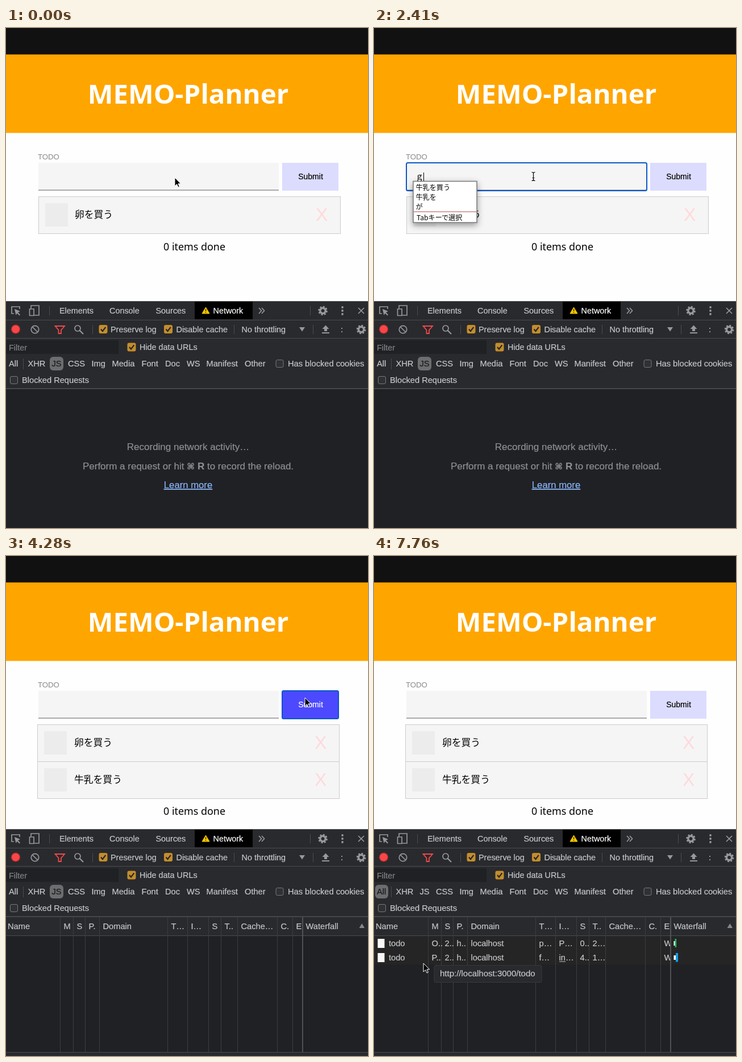
These frames come from a looping animation (637x879 px, 8 s). An HTML page:

```html
<!DOCTYPE html>
<html lang="ja">
<head>
<meta charset="utf-8">
<title>Task list</title>
<style>
html, body { margin: 0; width: 100%; height: 100%; overflow: hidden; background: #202124; }
svg { display: block; width: 100vw; height: 100vh; }
text { font-family: "Liberation Sans", Arial, sans-serif; white-space: pre; fill: currentColor; }
.jp text { font-family: "Noto Sans CJK JP", "Noto Sans CJK", sans-serif; }
.title, .jp .done { font-family: "Noto Sans", "Open Sans", sans-serif; text-anchor: middle; }
.title { font-size: 47.4px; font-weight: 700; color: #fff; }
.done { font-size: 17.9px; }
.item { font-size: 16.8px; }
.remove { font-size: 32px; color: #ffd9dc; }
.field { font-size: 14px; }
.mid { text-anchor: middle; }
.menu text { font: 600 12.2px Inter, "Noto Sans CJK JP", "Noto Sans CJK", sans-serif; color: #f1f3f4; }
.menu .kana { font-size: 11.5px; font-weight: 700; }
.ime text { font-size: 12.1px; }
.tools text { font-size: 14.65px; color: #c5c8cc; }
.tools text, .mid .field { stroke: currentColor; stroke-width: .2; }
.tools .bar text { font-size: 14.4px; }
.tools .dim { color: #808387; }
.tools .white { color: #fff; }
.tools .chosen { color: #18191b; }
.tools .hint { font-size: 17px; color: #8c8f92; text-anchor: middle; }
.tools .link { font-size: 16.7px; color: #8ab4f8; text-decoration: underline; }
.tools .url { font-size: 15px; }
.icon { fill: none; stroke: #95989c; stroke-width: 1.7; }
.rule { fill: none; stroke: #494c50; }
.ring { fill: none; stroke: #0b57c9; stroke-width: 2; }
</style>
</head>
<body>
<svg viewBox="0 0 637 879" preserveAspectRatio="none">
  <defs>
    <filter id="shadow" x="-40%" y="-40%" width="180%" height="190%">
      <feDropShadow dx="0" dy="4" stdDeviation="6" flood-opacity=".4"/>
    </filter>
    <clipPath id="tableClip"><rect y="634" width="521" height="240"/></clipPath>
    <g id="todo">
      <rect x=".5" y=".5" width="531" height="65" fill="#f5f5f5" stroke="#ccc"/>
      <rect x="12" y="12" width="40" height="41" fill="#ececec"/>
      <text class="remove" x="488" y="43">X</text>
    </g>
    <g id="gear" fill="none" stroke="#95989c">
      <circle r="4.7" stroke-width="3.4"/>
      <circle r="7" stroke-width="2.6" stroke-dasharray="3 2.5"/>
    </g>
    <g id="checked">
      <rect width="15" height="15" rx="3" fill="#c48d2b"/>
      <path d="M3.5 7.5L6.5 11L11.8 3.8" fill="none" stroke="#242528" stroke-width="2.2"/>
    </g>
    <rect id="unchecked" width="13" height="13" rx="2.5" fill="#303134" stroke="#77797c"/>
  </defs>

  <!-- page -->
  <rect width="637" height="481" fill="#fefefe"/>
  <rect width="637" height="47" fill="#111"/>
  <rect y="46.5" width="637" height="138" fill="#ffa500"/>
  <text class="title" x="320.5" y="133">MEMO-Planner</text>
  <text x="56" y="231" font-size="13.2" color="#888">TODO</text>
  <rect x="57" y="237" width="423" height="49" fill="#f5f5f5"/>
  <path d="M57 285H480" stroke="#aaa" stroke-width="2"/>

  <g class="mid">
    <rect x="486" y="237" width="99" height="49" fill="#dcdcff"/>
    <text class="field" x="536" y="266">Submit</text>
    <g data-on="3750-5630">
      <rect x="486" y="237" width="99" height="49" fill="#4c49ff"/>
      <text class="field" x="536" y="266" color="#fff">Submit</text>
    </g>
  </g>
  <rect class="ring" data-on="1340-4010" x="57" y="237" width="423" height="49" rx="2.5"/>
  <rect class="ring" data-on="4010-6690" x="486" y="237" width="99" height="49" rx="2.5"/>

  <g class="jp" data-on="0-4280">
    <use href="#todo" x="57" y="296"/>
    <text class="item" x="121" y="334">卵を買う</text>
    <text class="done" x="331.5" y="391">0 items done</text>
  </g>
  <g class="jp" data-on="4280-8000">
    <use href="#todo" x="55" y="296"/>
    <use href="#todo" x="55" y="361"/>
    <text class="item" x="120" y="334">卵を買う</text>
    <text class="item" x="120" y="399">牛乳を買う</text>
    <text class="done" x="331.5" y="455">0 items done</text>
  </g>

  <!-- typing -->
  <g class="jp">
    <text class="field" data-on="2410-2680" x="73" y="266">ｇ</text>
    <text class="field" data-on="2680-2950" x="73" y="266">ぎゅう</text>
    <text class="field" data-on="2950-4280" x="73" y="266">牛乳を買う</text>
    <path data-on="2950-3210" d="M73 270.5H143" stroke="#000"/>
  </g>
  <g stroke="#000">
    <path data-on="1340-1880 2140-2410" d="M73.5 254V270"/>
    <path data-on="2410-2680" d="M87.5 254V270"/>
    <path data-on="2680-2950" d="M114.5 254V270"/>
    <path data-on="2950-3750" d="M143.5 254V270"/>
  </g>
  <g class="ime jp" data-on="2410-2950">
    <rect x="69" y="269.5" width="112" height="72.5" fill="#fff" stroke="#777" stroke-width="1.5" filter="url(#shadow)"/>
    <text x="73.5" y="285">牛乳を買う</text>
    <text x="73.5" y="302">牛乳を</text>
    <text data-on="2410-2680" x="73.5" y="319">が</text>
    <text data-on="2680-2950" x="73.5" y="319">ぎゅう</text>
    <path d="M70 323H180.5" stroke="#b04a4a"/>
    <text x="75" y="338">Tabキーで選択</text>
  </g>

  <!-- developer tools -->
  <g class="tools">
    <rect y="480.5" width="637" height="399" fill="#202124"/>
    <rect y="480.5" width="637" height="153.5" fill="#292a2d"/>
    <rect x="332" y="481" width="102" height="31" fill="#000"/>
    <path class="rule" d="M0 513.5H637M0 545.5H637M76.5 489V505M535.5 489V505M152.5 522V538M401.5 522V538M540.5 522V538M30.5 581V600"/>
    <path d="M0 634H637" stroke="#505255" stroke-width="1.5"/>

    <g class="bar">
      <path class="icon" d="M14 502H10V490H24V494"/>
      <path d="M15 494L25 498L21 500L25 504L23.5 505.5L19.5 501.5L17.5 505Z" fill="#95989c"/>
      <path class="icon" d="M44 493V488H58V505H50M41.5 494H49V505.5H41.5Z"/>
      <text x="94" y="502">Elements</text>
      <text x="182" y="502">Console</text>
      <text x="263.5" y="502">Sources</text>
      <path d="M351.5 491L358 502H345Z" fill="#f5c400" stroke="#f5c400" stroke-linejoin="round"/>
      <path d="M351.5 494V498M351.5 499.5V501" stroke="#332a00" stroke-width="1.4"/>
      <text class="white" x="364.5" y="502">Network</text>
      <path class="icon" d="M445 492L449.5 497L445 502M450 492L454.5 497L450 502"/>
      <use href="#gear" x="557.5" y="497"/>
      <g fill="#95989c"><circle cx="592" cy="491" r="1.9"/><circle cx="592" cy="497" r="1.9"/><circle cx="592" cy="503" r="1.9"/></g>
      <path class="icon" d="M620 492L630 502M630 492L620 502"/>

      <circle cx="17" cy="529.5" r="8.5" fill="#7b2b2d"/>
      <circle cx="17" cy="529.5" r="7" fill="#fb4548"/>
      <g class="icon"><circle cx="51" cy="530" r="6.7"/><path d="M46.5 525.5L55.5 534.5"/></g>
      <path d="M86.5 524H103L97 531V537H92.5V531Z" fill="none" stroke="#f2494c" stroke-width="1.8"/>
      <g class="icon"><circle cx="126" cy="528" r="5"/><path d="M129.5 531.5L136 538" stroke-width="2.2"/></g>
      <use href="#checked" x="163.5" y="522"/><text x="184" y="535">Preserve log</text>
      <use href="#checked" x="278" y="522"/><text x="299.5" y="535">Disable cache</text>
      <text x="414.5" y="535">No throttling</text>
      <path d="M516 526H526L521 533.5Z" fill="#95989c"/>
      <path d="M562.5 522.5L568.5 529H565V533H560V529H556.5ZM556 535H569V537H556Z" fill="#95989c"/>
      <path d="M591 527V529M591 533V535" stroke="#95989c" stroke-width="2"/>
      <use href="#gear" x="625" y="530"/>

      <rect y="549" width="198" height="24" fill="#202124"/>
      <text class="dim" x="5" y="567">Filter</text>
      <use href="#checked" x="213.5" y="553.5"/><text x="235" y="566">Hide data URLs</text>
    </g>

    <g id="types"></g>
    <g data-on="0-6960">
      <rect x="77" y="578" width="24" height="24" rx="6" fill="#6c6d6f"/>
      <text x="5" y="595">All</text>
      <text class="chosen" x="80.5" y="595">JS</text>
    </g>
    <g data-on="6960-8000">
      <rect x="2" y="578" width="23" height="24" rx="6" fill="#6c6d6f"/>
      <text class="chosen" x="5" y="595">All</text>
      <text x="80.5" y="595">JS</text>
    </g>
    <use href="#unchecked" x="475" y="583.5"/><text x="496" y="595">Has blocked cookies</text>
    <use href="#unchecked" x="7.5" y="612.5"/><text x="28" y="624">Blocked Requests</text>

    <g data-on="0-4280">
      <text class="hint" x="320.5" y="742">Recording network activity…</text>
      <text class="hint" x="320.5" y="776">Perform a request or hit <tspan font-weight="700" font-family="DejaVu Sans, sans-serif" font-size="15">⌘</tspan> <tspan font-weight="700">R</tspan> to record the reload.</text>
      <text class="link mid" x="320.5" y="809">Learn more</text>
    </g>

    <g data-on="4280-8000">
      <rect y="635" width="637" height="32" fill="#292a2d"/>
      <rect y="873" width="637" height="6" fill="#292a2d"/>
      <rect data-on="6960-8000" y="668" width="637" height="50" fill="#252525"/>
      <path class="rule" d="M0 667.5H637M0 872.5H637"/>
      <path id="columns" fill="none" stroke="#3b3d40"/>
      <path d="M522 635V872" stroke="#5c5e61" stroke-width="1.6"/>
      <path d="M621.5 654H631L626.3 646Z" fill="#85888b"/>
      <text x="527.5" y="656">Waterfall</text>
      <g clip-path="url(#tableClip)">
        <g id="head"></g>
        <g id="rows" data-on="6960-8000"></g>
      </g>
      <g data-on="6960-8000">
        <path d="M6.5 673H18.5V689H6.5ZM6.5 698H18.5V714H6.5ZM527.5 677H530V685H527.5ZM527.5 702H531V710H527.5Z" fill="#f7f7f7"/>
        <path d="M326 713H337" stroke="#c5c8cc"/>
        <rect x="529.5" y="673" width="2.7" height="15" fill="#20b35c"/>
        <rect x="531" y="698" width="4" height="15.5" fill="#159ce8"/>
      </g>
    </g>

    <g data-on="6960-7220">
      <rect x="86.5" y="624.5" width="202" height="28" rx="2" fill="#292a2d" fill-opacity=".6" stroke="#333437"/>
      <text class="dim" x="95.5" y="643">Only show blocked requests</text>
    </g>
    <g data-on="7760-8000">
      <rect x="106" y="719.5" width="189" height="30" rx="2" fill="#292a2d" stroke="#38393c"/>
      <text class="url" x="116" y="739">http://localhost:3000/todo</text>
    </g>
  </g>

  <!-- autofill -->
  <g class="menu" data-on="1340-2410">
    <rect x="56" y="288.5" width="424" height="222.5" rx="4" fill="#292a2d" stroke="#38393c" stroke-width=".6"/>
    <text x="67.5" y="318">hogehoge</text>
    <text x="67.5" y="352.5">testtest</text>
    <text class="kana" x="67.5" y="387">ぬまぽん</text>
    <text x="67.5" y="422">foobar</text>
    <text x="67.5" y="456.5">hogehogehoge</text>
    <text class="kana" x="67.5" y="491">青空</text>
  </g>

  <g id="pointer">
    <path id="arrow" d="M0 0V15L3.6 11.6L6 17L8.3 16L6 10.8H10.6Z" fill="#000" stroke="#fff"/>
    <path id="beam" d="M-3 -7.5Q0 -7.5 0 -5.5V5.5Q0 7.5 -3 7.5M3 -7.5Q0 -7.5 0 -5.5M0 5.5Q0 7.5 3 7.5M-2 2.5H2" fill="none" stroke="#000" stroke-width="1.2"/>
  </g>
</svg>
<script>
const LOOP = 8000;
const byId = id => document.getElementById(id);

function putLabels(id, y, xs, labels) {
  labels.split('|').forEach((label, i) => {
    const text = document.createElementNS('http://www.w3.org/2000/svg', 'text');
    text.setAttribute('x', xs[i]);
    text.setAttribute('y', y);
    text.textContent = label;
    byId(id).append(text);
  });
}

putLabels('types', 595, [38.5, 109, 150.5, 186.5, 238.5, 280, 318, 352.5, 420],
  'XHR|CSS|Img|Media|Font|Doc|WS|Manifest|Other');

const edges = [95.5, 118.5, 139.5, 164.5, 284.5, 319.5, 356.5, 378.5, 407.5, 477.5, 504.5];
byId('columns').setAttribute('d', edges.map(x => `M${x} 635V872`).join(''));
const cells = edges.map(x => x + 6);
putLabels('head', 656, [3, ...cells], 'Name|M|S|P.|Domain|T…|I…|S|T..|Cache…|C.|E');
putLabels('rows', 686, [26, ...cells], 'todo|O..|2..|h..|localhost|p…|P…|0..|2…|||W');
putLabels('rows', 711, [26, ...cells], 'todo|P..|2..|h..|localhost|f…|in…|4..|1…|||W');

// start time, x, y, shape
const moves = [
  [0, 297, 263, 'arrow'], [270, 284, 264, 'arrow'], [540, 279, 260, 'arrow'],
  [1070, 280.5, 261, 'beam'], [3480, 353, 250, 'beam'],
  [3750, 535, 255, 'arrow'], [4010, 526, 249, 'arrow'], [5090, 524.5, 248.5, 'arrow'],
  [5360, 476, 312, 'arrow'], [5630, 437, 367, 'arrow'], [5890, 355, 549, 'arrow'],
  [6160, 40, 629, 'arrow'], [6430, 13, 590, 'arrow'], [6960, 150, 645, 'arrow'],
  [7220, 227, 671, 'arrow'], [7490, 87, 709, 'arrow'], [7760, 87, 716, 'arrow']
];

const timed = [...document.querySelectorAll('[data-on]')].map(el => ({
  el, spans: el.dataset.on.split(' ').map(span => span.split('-').map(Number))
}));

function draw(time) {
  for (const { el, spans } of timed) {
    const on = spans.some(([from, to]) => time >= from && time < to);
    el.style.display = on ? '' : 'none';
  }
  const [, x, y, shape] = moves.findLast(move => move[0] <= time);
  byId('pointer').setAttribute('transform', `translate(${x} ${y})`);
  for (const id of ['arrow', 'beam']) byId(id).style.display = id === shape ? '' : 'none';
}

const start = performance.now();
function tick() {
  draw((performance.now() - start) % LOOP);
  requestAnimationFrame(tick);
}
tick();
</script>
</body>
</html>
```
